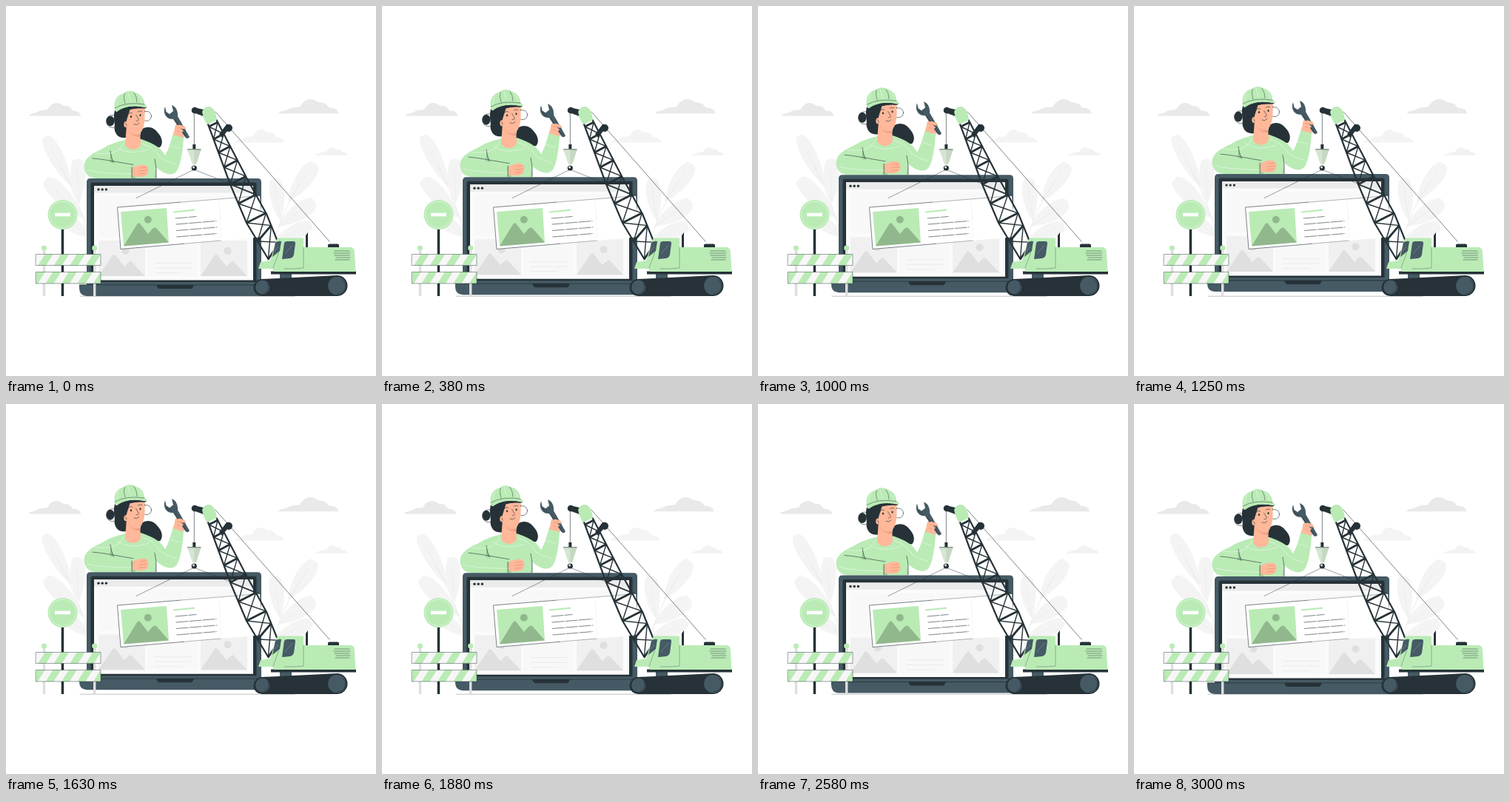
Animation, 500 px wide and 500 px high, one loop 3040 ms. Source, as an HTML page:

```html
<!DOCTYPE html>
<html lang="en">
<head>
<meta charset="utf-8">
<title>Under construction</title>
<style>
  html, body { margin: 0; width: 100%; height: 100%; overflow: hidden; background: #fff }
  svg { display: block; width: 100vw; height: 100vh }
  .g { fill: #baebb5 } .d { fill: #263238 } .m { fill: #455a64 } .s { fill: #ffb899 }
  .l { fill: none; stroke: #263238; stroke-width: .6; stroke-linecap: round; stroke-linejoin: round }
  .w { fill: none; stroke: #fff; stroke-width: .6; opacity: .7 }
</style>
</head>
<body>
<svg viewBox="0 0 500 500">
  <defs>
    <path id="cloud" d="M0 18C2 14 8 15 13 12C18 9 22 11 26 9C29 3 33 1 37 .5C43 0 45 4 49 4.500C56 4 57 8 60 11C67 11 70 14 71 18Z"/>
    <g id="picture">
      <path fill="#f0f0f0" d="M0 0H63V48H0Z"/>
      <circle cx="36.500" cy="14" r="5" fill="#dfdfdf"/>
      <path fill="#dfdfdf" d="M0 48L19 20Q21 18 23 20L35 35L41 29Q44 27 46 30L63 48Z"/>
    </g>
    <clipPath id="planks"><path d="M40.500 335.500H128V350.500H40.500ZM40.500 359.500H128V375H40.500Z"/></clipPath>
  </defs>

  <g id="clouds">
    <use href="#cloud" x="30.500" y="130.500" fill="#e9e9e9"/>
    <use href="#cloud" transform="translate(368 125.500)scale(1.150 1.100)" fill="#e9e9e9"/>
    <use href="#cloud" transform="translate(309 166.500)scale(.950 1)" fill="#f4f4f4"/>
    <use href="#cloud" transform="translate(417.500 191)scale(.620 .600)" fill="#f2f2f2"/>
  </g>
  <g id="leftPlant"></g>
  <g id="rightPlant"></g>

  <path class="l" d="M100 392.200H390" opacity=".5"/>

  <g id="float">
    <!-- hair behind the body -->
    <path class="d" d="M183 167C191 161 200 164 205 171C211 177 213 186 208 191C198 191 188 188 180 180Z"/>
    <ellipse class="d" cx="141" cy="155.500" rx="5.500" ry="7"/>
    <circle class="l" cx="144" cy="156" r="8.500"/>
    <circle class="l" cx="190" cy="149" r="6.500"/>
    <path class="d" d="M147 141C144 152 148 158 146.500 166C148 176 155 179 163 178L168 152L188 143L186 136Z"/>
    <!-- clothes -->
    <path class="g" d="M160 181C149 184 139 187 130 193C117 199 106 205 105.500 217C106 227 112 232 122 233H203V218C212 226 223 231 230 224C236 217 239 195 240 178L226 171C222 187 219 195 215 202C209 191 200 186 183 180Z"/>
    <path fill="#8fba8b" d="M142 196Q143 206 147 213L140 211ZM170 217L175 233H170ZM203 212L201 233H203Z" opacity=".6"/>
    <path class="l" d="M117 206C132 207 155 212 172 214.500M141 196Q142 206 145 211M170 218V232M201 207Q204 219 203 232"/>
    <path class="w" d="M120 199Q140 202 152 195Q158 188 160 184M110 222Q130 227 170 227M183 186Q199 190 208 204M150 191Q166 203 193 194M222 189L235 193M207 204Q217 211 230 214"/>
    <!-- neck and face -->
    <path class="s" d="M163 160L161 187C164 196 179 196 182 187L181 168Z"/>
    <path fill="#e99a7d" d="M165 168Q173 174 181 173V177Q172 178 165 168Z" opacity=".7"/>
    <path class="s" d="M163 141C160 155 163 173 175 174C186 174 189 157 187 136Z"/>
    <path class="d" d="M153 145L168 138C166 146 163 152 162 159C157 166 152 158 153 145Z"/>
    <ellipse class="s" cx="162" cy="160" rx="2.700" ry="4"/>
    <path class="l" d="M161 158Q163 159 163 162"/>
    <path class="l" d="M165 146Q168 143 171 145M178 143Q181 141 184 142.500" stroke-width="1.200"/>
    <ellipse class="d" cx="169" cy="149.500" rx="1.100" ry="1.500"/>
    <ellipse class="d" cx="181.500" cy="147.500" rx="1.100" ry="1.500"/>
    <path class="l" d="M175.500 147Q178 151 179.500 154Q178.500 156 176 155.500M173 160Q177 162 180 158.500" stroke-width=".9"/>
    <!-- helmet -->
    <path class="d" d="M147 142Q165 132 190 137L188 138.500Q164 137 149 146Z"/>
    <path class="g" d="M147 139C145 128 150 119 160 118C162 114 171 114 174 117C183 119 187 126 187 132L191 136C190 138 186 137 182 136C168 134 157 138 150 143Q147 143 147 139Z"/>
    <path class="l" d="M147 138Q163 129 187 133M160 118Q158 124 161 132M173 117Q177 123 177 130" opacity=".8"/>
    <path class="w" d="M153 122Q149 128 150 135M179 121Q183 126 184 131M165 117Q166 124 169 129"/>
    <!-- fists and wrench -->
    <path class="s" d="M171 219Q180 213 189 215Q194 218 192 225Q191 230 183 231L171 230Z"/>
    <path d="M181 219L190 218M180 223L191 222M180 227L189 226" fill="none" stroke="#e48d72" stroke-width=".7"/>
    <path class="s" d="M226 174L229 161L235 155Q238 155 236 161L242 163Q245 170 240 178Z"/>
    <path class="m" d="M215 136C212 143 215 151 222 152.500L226 153L242 177Q245 181 248 177L232 149C232.500 142 230 136 224 134L226 142L221 146L216.500 143Z"/>
    <path class="l" d="M228 154L243 176M217 145Q218 149 223 150"/>
    <path class="s" d="M228 163Q234 158 241 163L243 166Q239 167 236 165L240 169Q238 172 234 169L238 173Q235 175 231 171Z"/>
    <path d="M231 165L236 165M231 169L235 170" fill="none" stroke="#e48d72" stroke-width=".6"/>

    <!-- laptop -->
    <path class="m" d="M109 378V238Q109 233 114 233H340Q345 233 345 238V378Z"/>
    <path class="d" d="M114.500 373V241Q114.500 238.500 117 238.500H336Q338.500 238.500 338.500 241V373Z"/>
    <path fill="#fbfbfb" d="M119 243H334V370.500H119Z"/>
    <path fill="#ebebeb" d="M119 243H334V252.500H119Z"/>
    <g class="d"><circle cx="125" cy="248" r="1.700"/><circle cx="130.200" cy="248" r="1.700"/><circle cx="135.400" cy="248" r="1.700"/></g>
    <path fill="#f8f8f8" d="M125 257H327V312H125ZM191 317H259V365H191Z"/>
    <use href="#picture" x="125" y="317"/>
    <use href="#picture" x="263" y="317"/>
    <path d="M201 347.500H251M201 354H251M201 360.500H238" stroke="#ebebeb"/>
    <path class="m" d="M99 377H356V383Q354 392 346 392H109Q99 391.500 99 381Z"/>
    <path class="d" d="M99 376.500H356V377.300H99ZM203 377H254L252 381Q251 382 249 382H208Q206 382 205 381Z"/>
  </g>

  <!-- road sign and barrier -->
  <path class="d" d="M74.700 300H78.200V392H74.700Z"/>
  <circle class="g" cx="76.500" cy="282" r="20"/>
  <circle class="w" cx="76.500" cy="282" r="17.800"/>
  <path fill="#fff" d="M66 279.700H87V284.200H66Z"/>
  <path fill="#dedede" d="M49.800 330H53.200V392H49.800ZM118 330H121.400V392H118Z"/>
  <circle class="g" cx="51.500" cy="327" r="3.600"/><circle class="g" cx="119.700" cy="327" r="3.600"/>
  <g clip-path="url(#planks)">
    <path fill="#f7f7f7" d="M40 335H128V376H40Z"/>
    <path id="stripes" class="g"/>
  </g>
  <path class="l" d="M40.500 335.500H128V350.500H40.500ZM40.500 359.500H128V375H40.500Z" opacity=".75"/>

  <!-- hanging card -->
  <path class="l" d="M176 259.500L254 221L343 256" stroke-width=".45" opacity=".8"/>
  <path fill="#fff" d="M150.500 272L343 256.500L348 312L155 328.500Z"/>
  <path class="l" d="M235 265.200L150.500 272L155 328.500L240 321.300" stroke-width=".75"/>
  <path class="l" d="M235 265.200L343 256.500M240 321.300L290 317" stroke-width=".45" opacity=".6"/>
  <path class="g" d="M155 278L217 273L220 319.500L159 324.500Z"/>
  <path fill="#91b88c" d="M159 324.500L177 295Q179 292 181 294L192 308L198 301Q201 298 204 301L220 319.500Z"/>
  <circle cx="191.800" cy="288.800" r="5" fill="#91b88c"/>
  <path d="M226 278.500L255 275.700" stroke="#baebb5" stroke-width="2.200"/>
  <path class="l" d="M229 287L257 284.500M230 295L284 290.500M230.500 303.500L285 299M231 312L285 307.500" stroke-dasharray="16 2"/>
  <path d="M288 265L291 314" stroke="#eee" stroke-width=".6"/>

  <!-- hook -->
  <path class="l" d="M254.300 141V188"/>
  <path class="d" d="M252.300 187H256.300V194H252.300Z"/>
  <path fill="#d5e5d2" d="M245 194H263.500L257 214H252Z"/>
  <path fill="#c5d8c2" d="M254.300 194H263.500L257 214H254.300Z"/>
  <path d="M245 193.700H263.500" stroke="#78877a" stroke-width="1.200"/>
  <circle class="d" cx="254.300" cy="219" r="3.600"/><circle cx="253.500" cy="218" r="1.400" fill="#fff"/>

  <!-- crane -->
  <path class="l" d="M283 143L437 318" stroke-width=".5"/>
  <path id="bars" fill="none" stroke="#263238" stroke-width="2.800"/>
  <path id="braces" fill="none" stroke="#263238" stroke-width="1.400"/>
  <path id="rails" fill="none" stroke="#263238" stroke-width="2.200" stroke-linejoin="round"/>
  <path class="d" d="M288 173L298 160Q305 159 306 165Q304 171 299 169L292 178ZM254 137L267 140V149L253 144Z"/>
  <circle class="d" cx="255" cy="141" r="4.300"/><circle class="d" cx="301" cy="165" r="4.800"/>
  <path class="g" d="M265 143Q268 135 276 136Q282 139 284 148L285 154L272 160Q267 154 265 143Z"/>

  <path class="m" d="M370 361H386V368H370Z"/>
  <path class="d" d="M345 369Q390 367 447 364A14 14 0 0 1 448 392H347A11.500 11.500 0 0 1 345 369Z"/>
  <circle class="m" cx="346.700" cy="380" r="9.500"/><circle class="m" cx="447.300" cy="378" r="12.200"/>
  <path class="l" d="M353 374A9 9 0 0 1 349 388M455 370A11 11 0 0 1 449 389" stroke="#819099"/>
  <path class="d" d="M358 358.500H473V362.500H358ZM405 310L408 306V328H405ZM435 327V323Q435 321.500 437 321.500H448Q450 321.500 450 323V327Z"/>
  <path class="g" d="M341 355L344 346L357 344L365 317Q366 313.500 370 313.500H402V326H466Q471 327 471 333L472.500 359H362L360 355Z"/>
  <path class="l" d="M370 317L368 335L361 354M402 326V354L389 355H376" opacity=".55"/>
  <path class="m" d="M364 320Q365 318 369 318H372L370 331L360 339ZM376 320Q377 318 380 318H389Q391 318 391 321L389 336Q388 340 384 341L373 342Z"/>
  <path d="M377 335L387 323M363 331L368 325" stroke="#7c8b91" stroke-width=".7"/>
  <path class="l" d="M444 331H464M443 334H465M444 337H464M446 340H465M445 343H464" opacity=".8"/>
</svg>
<script>
  const $ = id => document.getElementById(id);
  const LOOP = 3040, TAU = 2 * Math.PI;

  // A leaf from its base to its tip, with a pale vein
  function leaf(bx, by, tx, ty, w) {
    const dx = tx - bx, dy = ty - by, len = Math.hypot(dx, dy);
    const at = (k, side) => [bx + dx * k - dy / len * w * side, by + dy * k + dx / len * w * side];
    return `<path fill="#f4f4f4" d="M${bx} ${by}C${at(.45, 1)} ${at(1.08, 1.1)} ${tx} ${ty}` +
      `C${at(1.08, -.7)} ${at(.4, -1)} ${bx} ${by}Z"/>` +
      `<path fill="none" stroke="#e9e9e9" stroke-width=".6" d="M${bx} ${by}L${at(.8, 0)}"/>`;
  }
  const plant = (stem, leaves) => leaves.map(v => leaf(...v)).join('') +
    `<path d="${stem}" fill="none" stroke="#e9e9e9" stroke-width=".8"/>`;

  $('leftPlant').innerHTML = plant('M117 330Q101 265 74 218', [
    [91, 246, 52, 177, 14], [99, 267, 95, 207, 14], [106, 287, 53, 236, 16], [114, 312, 77, 288, 13]]);
  $('rightPlant').innerHTML = plant('M358 335Q370 280 398 239', [
    [382, 264, 416, 212, 16], [371, 290, 362, 233, 14], [368, 298, 416, 263, 16], [362, 318, 412, 294, 14]]);

  let stripes = '';
  const stripeRow = (start, y) => {
    for (let x = start; x < 130; x += 21.5) stripes += `M${x} ${y + 16}l10-16h11l-10 16Z`;
  };
  stripeRow(43, 335);
  stripeRow(32, 359);
  $('stripes').setAttribute('d', stripes);

  // Boom: two bent rails joined by crossbars, with an X in each cell
  const leftRail = [[272, 157], [303, 241], [325, 293], [355, 343]];
  const rightRail = [[284, 153], [325, 232], [352, 281], [367, 318]];
  const along = (rail, y) => {
    const i = Math.max(1, rail.findIndex(p => p[1] >= y));
    const [x0, y0] = rail[i - 1], [x1, y1] = rail[i];
    return [x0 + (x1 - x0) * (y - y0) / (y1 - y0), y];
  };
  let bars = '', braces = '', last;
  [163, 180, 198, 218, 241, 267, 293, 318, 342].forEach((y, i) => {
    const a = along(leftRail, y), b = along(rightRail, y - 6 - i * 1.2 - (i > 6 ? 7 : 0));
    bars += `M${a}L${b}`;
    if (last) braces += `M${last[0]}L${b}M${last[1]}L${a}`;
    last = [a, b];
  });
  $('bars').setAttribute('d', bars);
  $('braces').setAttribute('d', braces);
  $('rails').setAttribute('d', `M${leftRail.join('L')}M${rightRail.join('L')}`);

  function draw() {
    const t = performance.now() % LOOP;
    const fromTop = Math.abs((t + 80) % LOOP - LOOP / 2);
    const lift = 7 * (1 - fromTop / (LOOP / 2));
    const sway = Math.sin(TAU * t / LOOP);
    const set = (id, value) => $(id).setAttribute('transform', value);
    set('float', `translate(0 ${.25 - lift})`);
    set('clouds', `translate(${1.4 * sway} 0)`);
    set('leftPlant', `rotate(${1.1 * sway} 117 330)`);
    set('rightPlant', `rotate(${.9 * sway} 358 335)`);
    requestAnimationFrame(draw);
  }
  draw();
</script>
</body>
</html>
```
